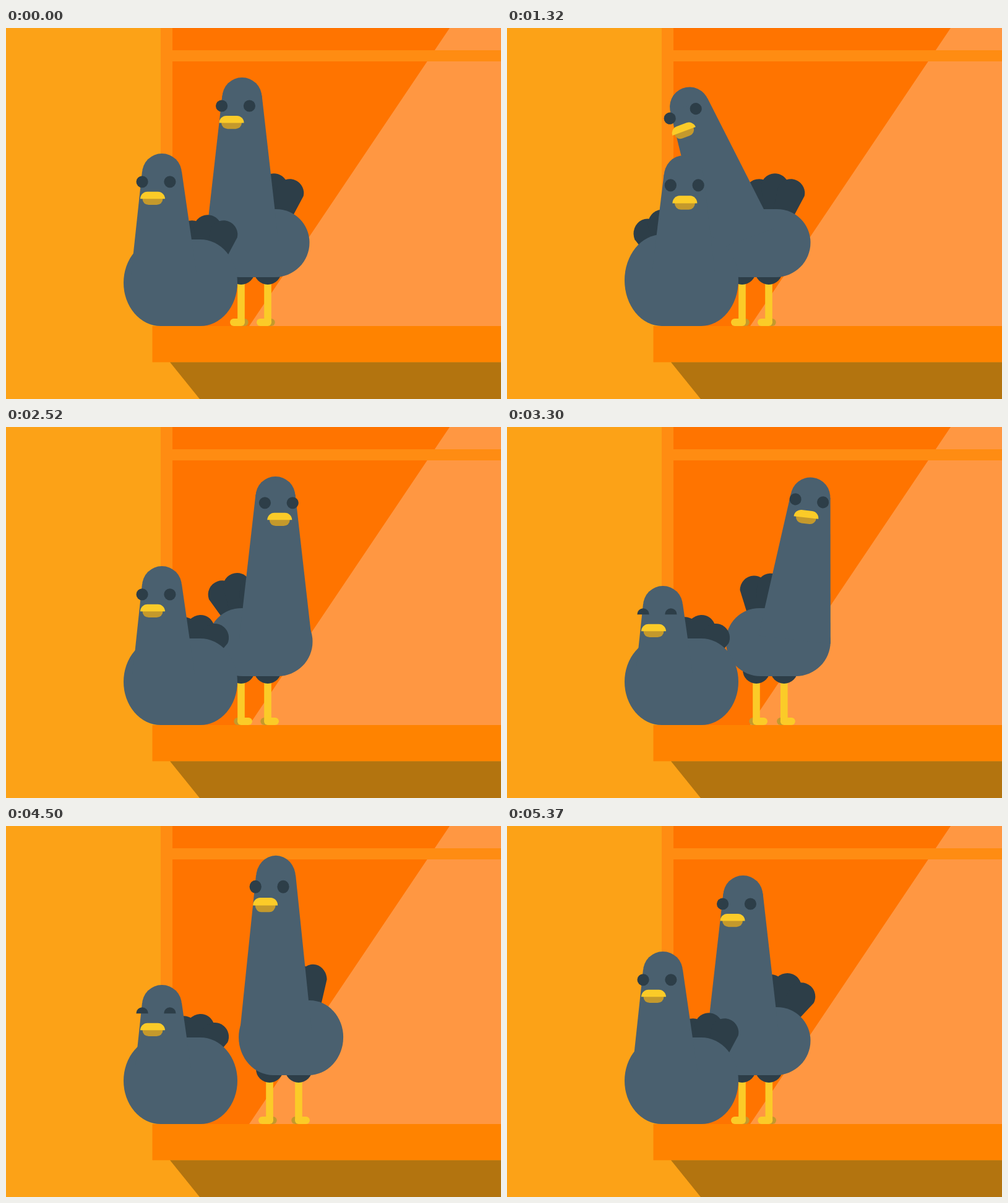
Recreate the animation shown at these times as an HTML page with a canvas. Size 800x600 px, loop 5.4 s.

```html
<!DOCTYPE html>
<html lang="en">
<head>
<meta charset="utf-8">
<title>Two pigeons</title>
<style>
  html, body { margin: 0; width: 100%; height: 100%; overflow: hidden; background: #fca217; }
  canvas { display: block; width: 800px; height: 600px; }
</style>
</head>
<body>
<canvas id="stage" width="800" height="600"></canvas>
<script>
const LOOP = 5400;
const ctx = document.getElementById('stage').getContext('2d');
const SKIN = '#4a606f', DARK = '#2d3e48', YELLOW = '#fbcb28', SHADE = '#c4992c';
const rad = Math.PI / 180;

// --- motion helpers, all in milliseconds ---

const clamp = u => Math.min(1, Math.max(0, u));

// Smooth rise from 0 to 1.
function ramp(t, start, length) {
  const u = clamp((t - start) / length);
  return u * u * (3 - 2 * u);
}

// Rise at one time, fall back at another.
const hold = (t, from, to, length) => ramp(t, from, length) - ramp(t, to, length);

const sum = (list, fn) => list.reduce((total, item, i) => total + fn(item, i), 0);

// A single up-and-down arc after each start.
const pulses = (t, starts, length) =>
  sum(starts, start => Math.sin(Math.PI * clamp((t - start) / length)));

// -1 looks left, 1 looks right; every turn flips it.
const facing = (t, turns, length) =>
  -1 + 2 * sum(turns, (start, i) => (i % 2 ? -1 : 1) * ramp(t, start, length));

// A tail drags behind each turn, then overshoots.
const sway = (t, turns) => sum(turns, (start, i) =>
  (i % 2 ? -1 : 1) * Math.sin(2 * Math.PI * clamp((t - start) / 400)));

// --- drawing helpers ---

function poly(color, ...pts) {
  ctx.fillStyle = color;
  ctx.beginPath();
  for (let i = 0; i < pts.length; i += 2) ctx.lineTo(pts[i], pts[i + 1]);
  ctx.fill();
}

function rect(color, x, y, w, h) {
  ctx.fillStyle = color;
  ctx.fillRect(x, y, w, h);
}

function disc(color, x, y, r) {
  ctx.fillStyle = color;
  ctx.beginPath();
  ctx.arc(x, y, r, 0, 7);
  ctx.fill();
}

function round(color, x, y, w, h, radii) {
  ctx.fillStyle = color;
  ctx.beginPath();
  ctx.roundRect(x, y, w, h, radii);
  ctx.fill();
}

// Scales the drawing vertically from a fixed base line.
function stretched(base, amount, draw) {
  ctx.save();
  ctx.translate(0, base);
  ctx.scale(1, amount);
  ctx.translate(0, -base);
  draw();
  ctx.restore();
}

function scene() {
  rect('#fca217', 0, 0, 800, 600);
  rect('#ff8c12', 250, 0, 550, 482);
  rect('#ff7400', 269, 0, 531, 482);
  poly('#ff9742', 717, 0, 800, 0, 800, 482, 393, 482);
  rect('#ff8c12', 269, 36, 531, 18);
  rect('#ff8300', 236.5, 482, 563.5, 58.5);
  poly('#b3740f', 265, 540.5, 800, 540.5, 800, 600, 313, 600);
}

// --- bird parts ---

function tail(x, y, turn) {
  for (const k of [-1, 0, 1]) {
    const len = k ? 73.7 : 78;
    ctx.save();
    ctx.translate(x, y);
    ctx.rotate((turn + k * 20.3) * rad);
    ctx.fillStyle = DARK;
    ctx.beginPath();
    ctx.arc(0, -len, 22.7, 188 * rad, 352 * rad);
    ctx.lineTo(12, 0);
    ctx.lineTo(-12, 0);
    ctx.fill();
    ctx.restore();
  }
}

// The head is centred on the current origin.
function neck(length, slopeL, slopeR) {
  disc(SKIN, 0, 0, 32);
  poly(SKIN, -32, -3, 32, -3, 32 + slopeR * length, length, -32 - slopeL * length, length);
}

function face(eyeX, eyeY, beakX, lid) {
  for (const side of [-22.4, 22.4]) {
    ctx.save();
    ctx.beginPath();
    ctx.rect(eyeX + side - 12, eyeY - 12, 24, 22 - lid * 9.6);
    ctx.clip();
    disc(DARK, eyeX + side, eyeY, 9.6);
    ctx.restore();
  }
  const y = eyeY + 16;
  round(SHADE, beakX - 16.5, y + 9, 33, 12.3, [0, 0, 10, 10]);
  round(YELLOW, beakX - 20, y, 40, 11.5, [11.5, 11.5, 0, 0]);
}

function leg(x, lift, dir) {
  const y = 482 - lift;
  const pill = (color, reach) => {
    const a = Math.min(x - 6, x + reach), b = Math.max(x + 6, x + reach);
    round(color, a, y - 12, b - a, 12, 6);
  };
  pill(SHADE, -11.7 * dir);
  pill(YELLOW, 18 * dir);
  rect(YELLOW, x - 5.8, 400, 11.6, y - 406);
  disc(DARK, x, 393, 22);
}

// --- the standing bird: stretches, peers both ways, then walks out and back ---

const TURNS = [2300, 4340];
const STEPS_OUT = [2900, 3350, 3680];
const STEPS_BACK = [4200, 4640, 5070];
const steps = t =>
  sum(STEPS_OUT, s => ramp(t, s, 240)) - sum(STEPS_BACK, s => ramp(t, s, 270));

function drawTall(t) {
  const look = facing(t, TURNS, 160);
  const x = 406 + 27.3 * steps(t) + 2.5 * (1 + look);
  const stretch = 1 + 0.065 * pulses(t, [100, 790, 1900], 220)
    + 0.1 * pulses(t, [1490, 2290, ...STEPS_OUT, 4390, 4640, 5070], 220);

  const lean = 12.3 * hold(t, 400, 780, 220) - 20.4 * hold(t, 780, 1480, 220)
    + 6.4 * hold(t, 2900, 3340, 220);
  const lift = 16 * hold(t, 400, 780, 220) + 7.6 * hold(t, 780, 1480, 220);
  const glance = 0.4 * hold(t, 2300, 3340, 160) + 0.6 * hold(t, 2900, 3340, 220);
  const eyeX = 10.5 * look + 0.17 * lean - 13 * glance;
  const wag = 15 * pulses(t, [120, 300, 900, 1600, 1960, 3270, 4700, 5000, 5310], 120);

  stretched(403, stretch, () => tail(x - 27 * look, 336, wag + 24 * sway(t, TURNS)));

  const moves = [...STEPS_OUT, ...STEPS_BACK];
  const late = t - 50;
  leg(380 + 23 * steps(t), 8 * pulses(t, moves, 240), facing(t + 60, TURNS, 160));
  leg(423 + 24.8 * steps(late), 8 * pulses(late, moves, 240),
    facing(t, [TURNS[0], TURNS[1] + 180], 160));

  stretched(403, stretch, () => {
    round(SKIN, x - 84.5, 293, 169, 110, [55, 55, 57, 57]);
    ctx.translate(x + 24.5 * look, 360);
    ctx.rotate(lean * rad);
    ctx.translate(0, -248);
    neck(232, 0.115, 0.115);
    face(eyeX, 14 - lift - 8 * glance, 1.5 * eyeX - 1.2, 0);
  });
}

// --- the sitting bird: glances about, dozes off, wakes ---

const GLANCES = [120, 430, 1240, 1980];
const DOZE = 2900, WAKE = 4640;

function drawLow(t) {
  const look = facing(t, GLANCES, 150);
  const tailLook = facing(t + 60, GLANCES, 150);
  const stretch = 1 + 0.057 * pulses(t, GLANCES, 160);
  const headY = 235 + 17 * hold(t, 150, WAKE, 300) + 5 * hold(t, 1240, WAKE, 300)
    + 32 * hold(t, DOZE, WAKE, 220);
  const half = 92 + 2 * pulses(t, [3400, 3900, WAKE], 500);

  const droop = hold(t, 430, 5060, 180);
  const fan = 12 * hold(t, 1200, WAKE + 100, 120)
    + 18 * pulses(t, GLANCES.map(g => g + 120), 100);
  const left = (1 - look) / 2;

  stretched(482, stretch, () => {
    tail(282 - tailLook * (44 - 28 * droop), 403, -tailLook * fan);
    round(SKIN, 282 - half, 342, half * 2, 140, { x: 60, y: 70 });
    ctx.translate(282 + 30 * look, headY);
    neck(400 - headY, 0.147 - 0.038 * left, 0.109 + 0.038 * left);
    face(9.5 * look, 13.8, 15 * look, hold(t, DOZE + 40, WAKE, 120));
  });
}

const start = performance.now();
function frame() {
  const t = (performance.now() - start) % LOOP;
  scene();
  drawTall(t);
  drawLow(t);
  requestAnimationFrame(frame);
}
frame();
</script>
</body>
</html>
```
